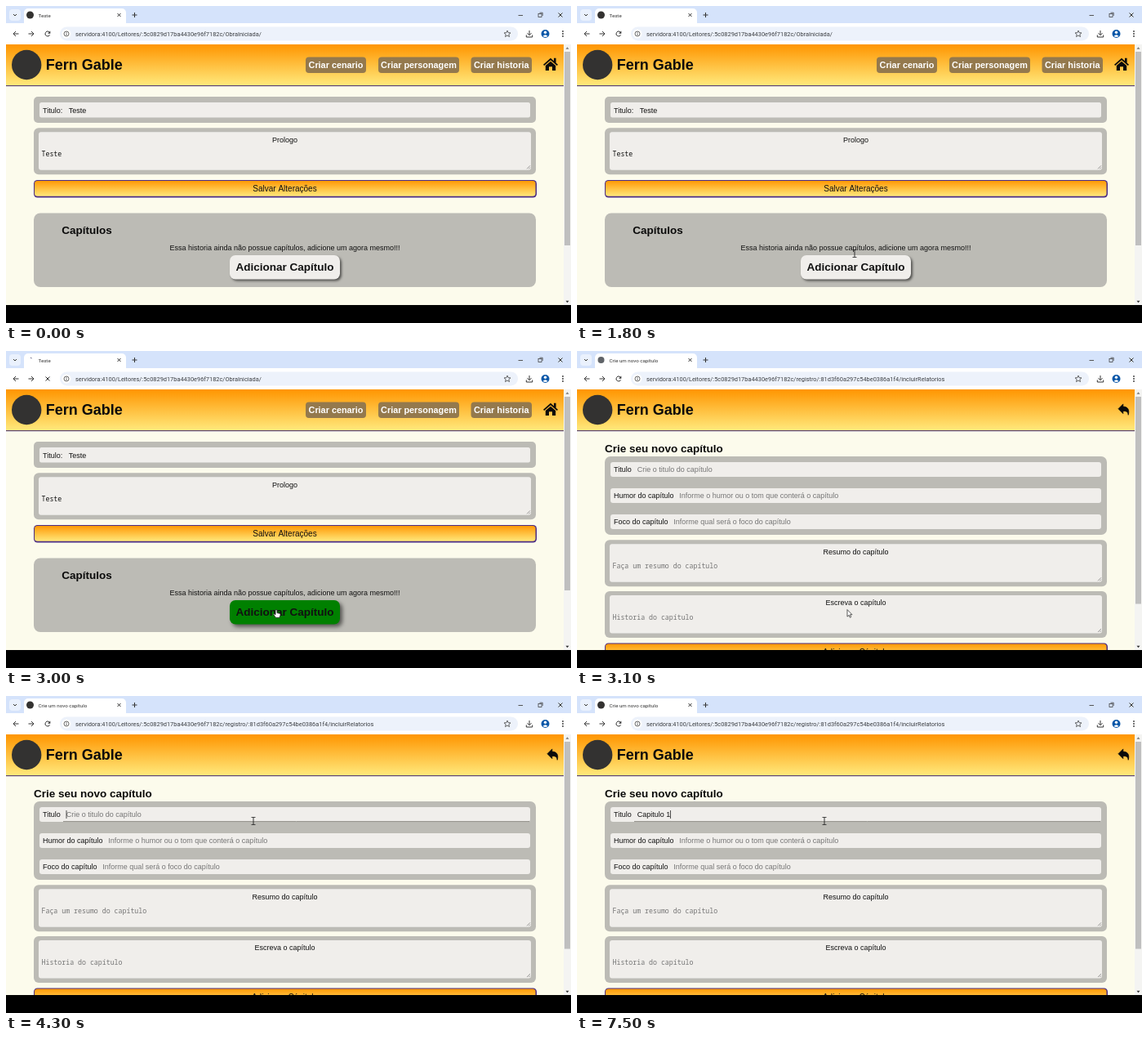
An HTML page with a canvas for the animation above (8 s loop, 692 px wide and 388 px high).

```html
<!DOCTYPE html>
<html lang="pt">
<head>
<meta charset="utf-8">
<title>Capítulos</title>
<style>
html, body { margin: 0; width: 100%; height: 100%; overflow: hidden; background: #000; }
canvas { display: block; width: 692px; height: 388px; }
</style>
</head>
<body>
<canvas id="stage" width="692" height="388"></canvas>
<script>
const ctx = document.getElementById('stage').getContext('2d');
const LOOP = 8000, STEP = 100;
const SANS = '"Liberation Sans", Arial, sans-serif';
const MONO = '"Noto Sans Mono", "DejaVu Sans Mono", monospace';
const UI = 'Roboto, "Open Sans", sans-serif';
const GREY = '#bcbbb5', FIELD = '#f0eeeb', HINT = '#757575', INK = '#111';
const HOST = 'servidora:4100/Leitores/:5c0829d17ba4430e96f7182c/';

const HOVER = 1900, LOAD = 3000, OPEN = 3100, FOCUS = 3900;
const TYPED = 'Capitulo 1';
const KEYS = [5000, 5200, 5600, 5900, 6200, 6400, 6600, 6800, 7100, 7500];

// time, x, y of the mouse
const PATH_A = [[700, 375, 2], [1500, 363, 82], [1600, 347, 295], [1700, 347, 295],
  [1800, 340, 303], [2000, 334, 315], [2300, 331, 318], [3200, 331, 317]];
const PATH_B = [[3200, 331, 317], [3800, 303, 157], [3900, 303, 153]];

function box(x, y, w, h, r, fill) {
  ctx.beginPath();
  ctx.roundRect(x, y, w, h, r);
  ctx.fillStyle = fill;
  ctx.fill();
}

function text(str, x, y, font, color = INK, align = 'left') {
  ctx.font = font;
  ctx.fillStyle = color;
  ctx.textAlign = align;
  ctx.fillText(str, x, y);
}

const body = (str, x, y, color) => text(str, x, y, `9px ${SANS}`, color);
const middle = (str, y, size = 9, weight = '') =>
  text(str, 341.5, y, `${weight} ${size}px ${SANS}`, INK, 'center');

function line(points, color = '#333', width = 1) {
  ctx.beginPath();
  points.forEach(([x, y]) => ctx.lineTo(x, y));
  ctx.strokeStyle = color;
  ctx.lineWidth = width;
  ctx.stroke();
}

function disc(x, y, r, fill) {
  ctx.beginPath();
  ctx.arc(x, y, r, 0, 7);
  ctx.fillStyle = fill;
  ctx.fill();
}

function shape(d, x, y, fill, stroke) {
  const p = new Path2D(d);
  ctx.save();
  ctx.translate(x, y);
  if (fill) { ctx.fillStyle = fill; ctx.fill(p); }
  if (stroke) { ctx.strokeStyle = stroke; ctx.lineWidth = 0.8; ctx.stroke(p); }
  ctx.restore();
}

function cross(x, y, r, color = '#333') {
  line([[x - r, y - r], [x + r, y + r]], color);
  line([[x - r, y + r], [x + r, y - r]], color);
}

function sunrise(y, h) {
  const g = ctx.createLinearGradient(0, y, 0, y + h);
  g.addColorStop(0, '#ff9500');
  g.addColorStop(1, '#ffe97c');
  return g;
}

function tabStrip(t) {
  ctx.fillStyle = '#d5e3fb';
  ctx.fillRect(0, 0, 692, 24);
  box(4, 4, 14, 14, 4, '#eaf1fd');
  line([[9, 10], [11, 12], [13, 10]]);
  box(22, 3, 125, 21, [5, 5, 0, 0], '#fff');
  if (t >= LOAD && t < OPEN) {
    line([[30, 8], [31.5, 9]], '#557');
  } else if (t >= OPEN && t < 3300) {
    disc(29.5, 11, 4, '#5f6368');
  } else {
    disc(29.5, 11, 4.5, '#333231');
  }
  text(t < OPEN ? 'Teste' : 'Crie um novo capítulo', 39.5, 13.5, `6.2px ${UI}`, '#333');
  cross(138.5, 11, 2);
  line([[154.5, 11], [160.5, 11]]);
  line([[157.5, 8], [157.5, 14]]);
  line([[627.5, 11.5], [633, 11.5]], '#555');
  ctx.lineWidth = 0.8;
  ctx.strokeStyle = '#444';
  ctx.strokeRect(652, 9.5, 4, 4);
  line([[653.5, 8.2], [657.2, 8.2], [657.2, 12]], '#444', 0.8);
  cross(679, 11, 2.5);
}

function toolbar(t) {
  ctx.fillStyle = '#fff';
  ctx.fillRect(0, 21, 692, 26);
  line([[15.5, 34], [9, 34]]);
  line([[12, 31], [9, 34], [12, 37]]);
  line([[27.5, 34], [34, 34]]);
  line([[31, 31], [34, 34], [31, 37]]);
  if (t >= LOAD && t < OPEN) {
    cross(51, 34, 2.5);
  } else {
    ctx.beginPath();
    ctx.arc(51, 34, 3, 0.5, 5.6);
    ctx.lineWidth = 1;
    ctx.strokeStyle = '#333';
    ctx.stroke();
    shape('M0 0V3.2H-3.2Z', 54.3, 30.5, '#333');
  }
  box(66, 25.5, 561, 17, 8.5, '#edf2fb');
  disc(74, 34, 5.5, '#fff');
  ctx.beginPath();
  ctx.arc(74, 34, 3, 0, 7);
  ctx.lineWidth = 0.8;
  ctx.strokeStyle = '#444';
  ctx.stroke();
  line([[74, 33.5], [74, 35.7]], '#444', 0.9);
  disc(74, 32.3, 0.5, '#444');
  const end = t < OPEN ? 'ObraIniciada/' : 'registro/:81d3f60a297c54be0386a1f4/incluirRelatorios';
  text(HOST + end, 85, 36.7, `7.4px ${UI}`, '#3c3f43');
  shape('M0-4L1.1-1.3 4-1.1 1.8.8 2.5 3.6 0 2.1-2.5 3.6-1.8.8-4-1.1-1.1-1.3Z', 614, 34, null, '#444');
  line([[641, 30], [641, 35.5]]);
  line([[638.5, 33.2], [641, 35.7], [643.5, 33.2]]);
  line([[637.3, 35.5], [637.3, 38], [644.7, 38], [644.7, 35.5]]);
  disc(660.5, 34, 5, '#0b57a8');
  disc(660.5, 32.3, 1.7, '#fff');
  shape('M-3 3Q0-.6 3 3Q0 5-3 3Z', 660.5, 34, '#fff');
  [31, 34, 37].forEach(y => disc(682, y, 0.9, '#333'));
}

function scrollbar(thumbEnd) {
  ctx.fillStyle = '#f4f4f2';
  ctx.fillRect(683, 47, 9, 319);
  ctx.fillStyle = '#bfbfbf';
  ctx.fillRect(684, 56, 7, thumbEnd - 56);
  shape('M-2 1.2H2L0-1.2Z', 687.5, 51.5, '#777');
  shape('M-2-1.2H2L0 1.2Z', 687.5, 362, '#333');
}

function header() {
  ctx.fillStyle = sunrise(47, 50);
  ctx.fillRect(0, 47, 683, 50);
  ctx.fillStyle = '#5b4472';
  ctx.fillRect(0, 97, 683, 1.2);
  disc(25.2, 72, 18.2, '#333231');
  text('Fern Gable', 48.8, 78.3, `bold 18px ${SANS}`, '#0b0b0b');
}

function panel(y, h, r = 6) {
  box(34, y, 615, h, r, GREY);
}

function area(y, title, value, color) {
  panel(y, 57);
  box(40, y + 5, 603, 46.5, 3, FIELD);
  middle(title, y + 17.3);
  text(value, 43.5, y + 35, `8.25px ${MONO}`, color);
  line([[638, y + 50], [642, y + 46]], '#777', 0.7);
  line([[640.3, y + 50], [642, y + 48.3]], '#777', 0.7);
}

function bigButton(y, label) {
  box(34, y, 616, 21.5, 4.5, '#4b2d86');
  box(35, y + 1, 613.5, 18.7, 3.5, sunrise(y, 20));
  middle(label, y + 14, 10);
}

function navButton(x, w, label) {
  box(x, 62.5, w, 19.5, 4, '#94794d');
  text(label, x + w / 2, 76, `bold 10.85px ${SANS}`, '#fff', 'center');
}

function storyPage(t) {
  navButton(367, 74, 'Criar cenario');
  navButton(456, 99, 'Criar personagem');
  navButton(569.5, 74.5, 'Criar historia');
  shape('M0-8L9 0 7.8 1.4 0-5.4-7.8 1.4-9 0ZM4-8H6.6V-2L4-4.4ZM0-4L6.2 1.4V7.4H2V2.6H-2V7.4H-6.2V1.4Z',
    667, 71.7, '#0b0b0b');

  panel(111, 32, 5);
  box(41, 118, 601, 18.5, 2.5, FIELD);
  body('Titulo:', 45, 130.5);
  body('Teste', 76.7, 130.5);
  area(149.3, 'Prologo', 'Teste', INK);
  bigButton(213, 'Salvar Alterações');

  panel(253.5, 90.5, 8);
  text('Capítulos', 68.3, 279, `bold 13.5px ${SANS}`, '#0b0b0b');
  middle('Essa historia ainda não possue capítulos, adicione um agora mesmo!!!', 299);
  const k = Math.min(1, Math.max(0, (t - HOVER + STEP) / 500));
  const mix = (a, b) => Math.round(a + (b - a) * k);
  ctx.save();
  ctx.shadowColor = 'rgba(0,0,0,.55)';
  ctx.shadowBlur = 3 + 2 * k;
  ctx.shadowOffsetX = ctx.shadowOffsetY = 2 + k;
  box(274, 305, 135, 29.5, 7, `rgb(${mix(240, 0)},${mix(238, 128)},${mix(235, 0)})`);
  ctx.restore();
  middle('Adicionar Capítulo', 324.3, 13.5, 'bold');
}

function input(y, label, hintX, hint) {
  box(41, y, 601, 18, 3, FIELD);
  body(label, 45, y + 12.3);
  if (hint) body(hint, hintX, y + 12.3, HINT);
}

function chapterPage(t) {
  shape('M-7-1L-1.2-6.8V-3.6C4.5-3.6 7 .2 5.2 6.6 5 3 3 1.7-1.2 1.7V4.9Z', 670, 71.7, '#0b0b0b', '#0b0b0b');
  text('Crie seu novo capítulo', 34, 123.5, `bold 13.5px ${SANS}`, '#0b0b0b');
  panel(129, 96, 7);
  const count = KEYS.filter(k => k <= t).length;
  input(136, 'Titulo', 73.7, count ? '' : 'Crie o titulo do capítulo');
  input(168, 'Humor do capítulo', 125.2, 'Informe o humor ou o tom que conterá o capítulo');
  input(200, 'Foco do capítulo', 118.2, 'Informe qual será o foco do capítulo');

  if (t >= FOCUS) {
    const value = TYPED.slice(0, count);
    line([[70, 153.6], [641, 153.6]], '#77756f', 0.8);
    body(value, 73.7, 148.3);
    const since = t - (count ? KEYS[count - 1] : FOCUS);
    if (since % 1000 < 500) {
      const x = 74 + ctx.measureText(value).width;
      line([[x, 140], [x, 150]], '#222', 0.8);
    }
  }

  area(231.3, 'Resumo do capítulo', 'Faça um resumo do capítulo', HINT);
  area(294, 'Escreva o capítulo', 'Historia do capítulo', HINT);
  bigButton(357.5, 'Adicionar Cápitulo');
}

function along(path, t) {
  const last = path[path.length - 1];
  if (t >= last[0]) return last.slice(1);
  const i = path.findIndex(p => p[0] > t);
  const [t0, x0, y0] = path[i - 1], [t1, x1, y1] = path[i];
  const k = (t - t0) / (t1 - t0), e = k * k * (3 - 2 * k);
  return [x0 + (x1 - x0) * e, y0 + (y1 - y0) * e];
}

function mouse(t) {
  if (t < PATH_A[0][0]) return;
  const [x, y] = along(t < PATH_B[0][0] ? PATH_A : PATH_B, t);
  if ((t >= 1600 && t < HOVER) || t >= 3700) {
    line([[x, y - 4.5], [x, y + 4.5]], '#222', 0.9);
    line([[x - 2.5, y - 4.5], [x + 2.5, y - 4.5]], '#222', 0.8);
    line([[x - 2.5, y + 4.5], [x + 2.5, y + 4.5]], '#222', 0.8);
  } else if (t >= HOVER && t < OPEN) {
    shape('M-1 0Q0-1 1 0V3.4L4.5 4.2Q5.4 4.6 5 6.2L4 9.2H-.6L-3.4 5.4Q-3.2 4-1 5.6Z', x, y, '#fff', '#222');
  } else {
    shape('M0 0V8.6L2 6.8 3.3 9.7 4.7 9.1 3.4 6.2H6Z', x, y - 0.5, '#fff', '#333');
  }
}

function draw(t) {
  ctx.fillStyle = '#fcfbec';
  ctx.fillRect(0, 0, 692, 388);
  header();
  if (t < OPEN) storyPage(t);
  else chapterPage(t);
  scrollbar(t < OPEN ? 293 : 309.5);
  tabStrip(t);
  toolbar(t);
  mouse(t);
  ctx.fillStyle = '#000';
  ctx.fillRect(0, 366, 692, 22);
}

const start = performance.now();
function tick() {
  const t = (performance.now() - start) % LOOP;
  draw(Math.floor(t / STEP) * STEP);
  requestAnimationFrame(tick);
}
tick();
</script>
</body>
</html>
```
